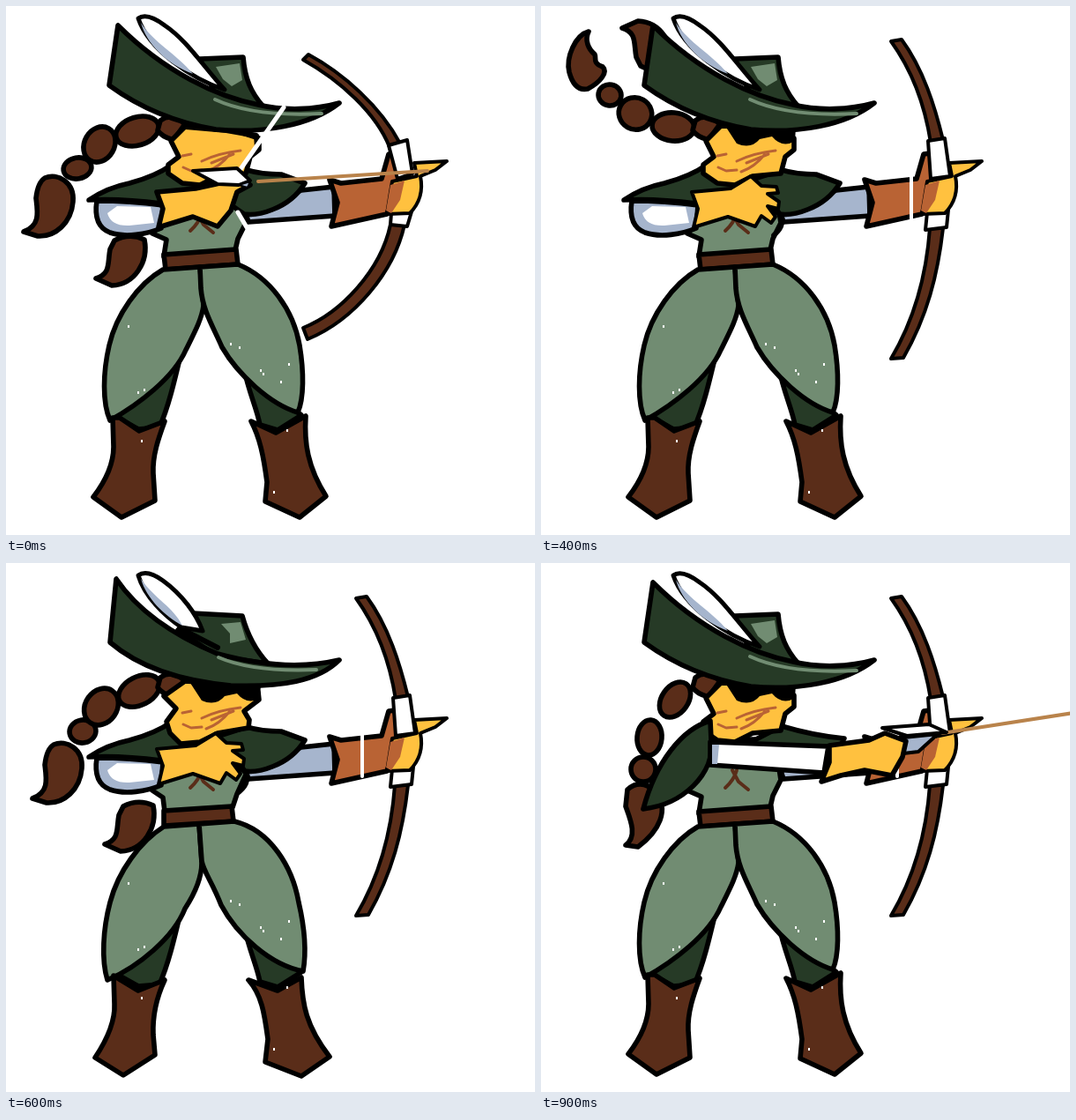
An HTML page with a canvas for the animation above (1 s loop, 600 px wide and 600 px high).

```html
<!DOCTYPE html>
<html lang="en">
<head>
<meta charset="utf-8">
<title>Archer</title>
<style>
html, body { margin: 0; width: 100%; height: 100%; overflow: hidden; background: #fff; }
canvas { display: block; width: 600px; height: 600px; }
</style>
</head>
<body>
<canvas id="stage" width="600" height="600"></canvas>
<script>
const ctx = document.getElementById('stage').getContext('2d');
const DARK = '#263a26', GREEN = '#718c72', BROWN = '#5a2d19', SKIN = '#ffc13f',
  RUST = '#b96334', BLUE = '#a6b5cd', WHITE = '#fff', INK = '#000', SHAFT = '#b9834b';
const PEN = 5.6;

ctx.lineJoin = ctx.lineCap = 'round';

function shape(d, fill, width = PEN) {
  const p = new Path2D(d);
  ctx.fillStyle = fill;
  ctx.fill(p);
  if (width) {
    ctx.strokeStyle = INK;
    ctx.lineWidth = width;
    ctx.stroke(p);
  }
}

function line(d, color, width) {
  ctx.strokeStyle = color;
  ctx.lineWidth = width;
  ctx.stroke(new Path2D(d));
}

function bead([x, y, rx, ry, deg]) {
  ctx.beginPath();
  ctx.ellipse(x, y, rx, ry, deg * Math.PI / 180, 0, 7);
  ctx.fillStyle = BROWN;
  ctx.fill();
  ctx.strokeStyle = INK;
  ctx.lineWidth = PEN;
  ctx.stroke();
}

const TAIL = 'M44 195 C59 189 78 200 76 222 C74 246 56 262 36 261 L20 256 C39 249 36 234 34 218 Q36 200 44 195Z';
const TAIL_LOW = 'M123 266 Q140 257 157 265 C162 290 146 316 120 317 L102 309 C119 304 115 292 118 276Z';
const TAIL_MID = 'M61 46 C46 50 35 75 39 92 C43 107 50 113 60 111 C75 103 83 92 77 86 C65 82 70 76 68 72 C61 66 56 56 61 46Z';

function tail(d, dx = 0, dy = 0, flip = 1) {
  ctx.save();
  ctx.translate(dx, dy);
  ctx.scale(1, flip);
  shape(d, BROWN);
  ctx.restore();
}

const hair = {
  rest() {
    tail(TAIL_LOW);
    [[81, 184, 16, 12, -10], [106, 157, 17, 21, 30], [149, 142, 25, 16, -17]].forEach(bead);
    tail(TAIL);
  },
  sway() {
    tail(TAIL_LOW, 10, 10);
    [[87, 191, 15, 13, -10], [108, 163, 18, 22, 35], [151, 145, 25, 16, -27]].forEach(bead);
    tail(TAIL, 10, 11);
  },
  up() {
    tail(TAIL_LOW, -17, 318, -1);
    [[78, 86, 15, 11, 10], [104, 114, 20, 18, 40], [149, 131, 25, 16, 15]].forEach(bead);
    tail(TAIL, -2, 274, -1);
  },
  fall() {
    tail(TAIL_LOW, -10, 334, -1);
    [[78, 101, 13, 12, 10], [107, 122, 19, 18, 30], [150, 137, 24, 16, 5]].forEach(bead);
    tail(TAIL_MID, -7, -17);
  },
  half() {
    shape('M124 28 C105 35 98 58 104 78 Q110 90 125 88 L150 118 L180 125 L150 70Z', BROWN);
    [[83, 115, 12, 14, -15], [112, 131, 18, 19, 40], [152, 142, 23, 15, -15]].forEach(bead);
    tail(TAIL_MID);
  },
  swing() {
    shape('M98 257 Q114 243 130 260 C146 280 134 304 110 322 L96 320 C110 310 101 290 96 276Z', BROWN);
    [[116, 234, 14, 14, 0], [123, 198, 14, 20, 5], [152, 155, 15, 22, 35]].forEach(bead);
  }
};

function specks() {
  ctx.fillStyle = WHITE;
  for (const [x, y] of [[138, 362], [156, 434], [149, 437], [264, 386], [254, 382],
    [288, 412], [291, 416], [320, 405], [311, 425], [153, 492], [318, 480], [303, 550]])
    ctx.fillRect(x, y, 2, 3);
}

function legs(alt) {
  shape('M125 466 L199 392 C190 430 184 455 174 478 L150 480Z', DARK);
  shape('M270 412 C276 440 284 455 288 475 L308 481 L335 464Z', DARK);
  if (alt) {
    shape('M179 299 C152 316 127 350 118 385 C110 415 108 450 115 473 C150 458 190 425 203 392 C216 372 222 355 222 340 L219 296Z', GREEN);
    shape('M219 296 L259 293 C300 303 325 345 332 385 C339 415 341 440 337 463 C300 456 262 422 244 388 C234 362 224 350 222 338Z', GREEN);
    shape('M122 468 L150 485 L180 473 C172 490 166 510 167 535 L169 558 L133 581 L101 561 C115 540 124 520 123 500Z', BROWN);
    shape('M275 473 L308 485 L335 470 C336 500 340 525 367 560 L335 582 L294 566 L297 540 C293 510 290 490 275 473Z', BROWN);
  } else {
    shape('M178 299 C150 315 125 350 117 385 C110 415 109 450 118 470 C150 452 190 422 204 390 C214 370 222 355 224 340 L220 296Z', GREEN);
    shape('M220 296 L263 293 C300 308 326 345 333 385 C338 415 338 445 331 461 C300 452 263 418 245 387 C234 362 223 345 221 320Z', GREEN);
    shape('M121 467 L129 467 L151 482 L180 471 C173 490 166 510 167 530 L169 561 L131 580 L99 557 C112 540 122 520 122 500Z', BROWN);
    shape('M278 471 L306 484 L340 465 C338 495 342 523 363 556 L333 580 L294 562 L296 540 C292 510 288 490 278 471Z', BROWN);
  }
  specks();
}

function torso(alt) {
  shape(alt
    ? 'M178 200 L176 238 L166 258 L178 266 L180 282 L257 277 L262 262 L272 240 L262 200Z'
    : 'M186 200 L178 240 L166 258 L182 265 L179 284 L260 277 L263 264 L272 246 L265 200Z', GREEN);
  line('M222 235 Q219 246 209 255 M217 235 L224 248 L235 257', BROWN, 4);
  shape(alt ? 'M179 281 L256 276 L258 293 L179 298Z' : 'M179 282 L261 276 L263 293 L181 299Z', BROWN);
}

function bow(drawn) {
  if (drawn) {
    shape('M337 61 L343 55 C382 76 425 114 447 156 L435 160 C420 122 380 85 337 61Z', BROWN, 4);
    shape('M436 248 L452 248 C440 302 395 356 342 378 L337 365 C380 348 425 300 436 248Z', BROWN, 4);
    shape('M434 158 L455 152 L461 190 L444 196Z', WHITE, 4);
    shape('M437 235 L461 230 L455 250 L436 248Z', WHITE, 4);
  } else {
    shape('M397 40 L409 38 C434 72 447 115 456 152 L442 155 C436 116 423 76 397 40Z', BROWN, 4);
    shape('M441 252 L456 252 C450 305 438 352 411 399 L397 400 C422 358 437 308 441 252Z', BROWN, 4);
    shape('M439 153 L458 150 L464 193 L442 196Z', WHITE, 4);
    shape('M438 234 L462 231 L460 251 L436 254Z', WHITE, 4);
  }
}

function bowArm(drawn) {
  shape('M367 197 L380 201 L426 196 L434 168 L441 167 L446 200 L432 236 L369 250 L376 223Z', RUST);
  bow(drawn);
  shape('M463 178 L500 176 L487 186 L470 193 Q475 218 458 235 L432 236 L438 199 L466 193Z', SKIN, 4);
  shape('M436 203 L452 198 L447 220 L437 235 L431 232Z', RUST, 0);
}

function face(masked, alt) {
  shape('M175 130 Q188 120 203 134 L190 152 Q176 148 172 141Z', BROWN);
  shape(alt
    ? 'M203 134 L179 151 L193 165 L182 180 L186 193 L198 205 L220 203 L240 193 L275 187 L276 178 L270 168 L287 155 L286 146 L250 137Z'
    : 'M204 136 L187 153 L196 171 L184 180 L184 190 L200 201 L220 203 L240 193 L272 190 L277 171 L287 163 L287 150 L250 138Z', SKIN);
  if (masked) shape('M207 133 L222 156 Q238 163 248 151 L262 148 Q274 162 288 153 L289 138Z', INK, 0);
  else line('M204 137 L250 141 L284 147 L285 161', INK, 6);
  line('M200 170 L210 168 M201 183 L210 187 L222 186 M222 176 Q240 167 266 164 M227 188 Q242 183 254 168 M233 178 L258 168', RUST, 3);
}

function hat(alt) {
  if (alt) {
    shape('M212 57 L268 60 C274 82 284 100 297 114 L240 106 L195 76Z', DARK);
    shape('M244 69 L266 67 L272 87 L254 91 L254 80Z', GREEN, 0);
    shape('M125 18 L118 90 C152 119 200 134 255 139 C312 141 354 134 378 110 C340 119 295 118 240 103 C190 82 150 55 125 18Z', DARK);
    line('M241 107 Q280 124 352 121', GREEN, 4);
    shape('M150 14 Q160 7 178 20 C200 36 216 58 223 77 L199 73 C180 60 157 38 150 14Z', WHITE, 5);
    shape('M153 18 C168 40 190 50 200 71 C180 60 159 40 153 18Z', BLUE, 0);
    line('M199 75 L240 96', INK, 6);
  } else {
    shape('M220 60 L269 58 C271 83 278 98 291 113 L240 106Z', DARK);
    shape('M238 69 L265 65 L268 84 L256 91 L246 83Z', GREEN, 0);
    shape('M127 22 L117 90 C150 114 190 132 238 140 C290 145 345 136 378 110 C350 118 315 119 286 112 C240 103 180 75 127 22Z', DARK);
    line('M237 106 Q280 126 358 122', GREEN, 4);
    shape('M150 14 Q160 7 180 22 C204 38 222 66 248 95 C210 82 162 50 150 14Z', WHITE, 5);
    shape('M153 19 C168 42 193 54 212 77 C182 66 159 42 153 19Z', BLUE, 0);
  }
}

function cape() {
  shape('M94 220 Q115 206 140 201 Q170 193 188 180 L202 199 L220 203 L273 186 Q290 191 312 191 L339 201 Q326 222 302 231 Q285 238 270 236 L240 215 L176 224 Q130 218 94 220Z', DARK);
}

function restArm(drawn) {
  shape('M103 221 C100 240 105 252 118 257 C135 263 160 259 176 252 L178 226 Q140 221 103 221Z', BLUE);
  shape('M115 235 L126 227 L164 228 L168 246 L140 249 Q119 250 115 235Z', WHITE, 0);
  if (drawn) {
    shape('M171 211 L215 207 L238 202 L262 196 L277 203 L262 211 L255 232 L240 250 L212 239 L173 251 L178 230Z', SKIN);
    shape('M212 187 L262 184 L277 198 L264 203 L240 202Z', WHITE, 4);
    shape('M264 203 L277 199 L274 206Z', BLUE, 2);
  } else {
    line('M268 232 Q280 247 264 260', INK, PEN);
    shape('M171 211 L215 207 L238 193 L250 204 L267 205 L269 212 L257 213 L270 222 L269 230 L257 227 L266 239 L261 246 L250 238 L243 250 L212 239 L173 251 L178 230Z', SKIN, 4);
  }
}

function reachArm() {
  shape('M192 179 C160 188 130 226 116 279 C160 274 198 240 193 200Z', DARK);
  shape('M192 203 L326 208 L321 238 L192 229Z', WHITE);
  shape('M194 206 L202 206 L200 228 L194 228Z', BLUE, 0);
  shape('M327 207 L372 201 L390 193 L414 202 L410 220 L398 241 L367 235 L340 241 L318 248 L327 226Z', SKIN);
}

function looseArrow(x, y, endY) {
  line(`M${x} ${y} L604 ${endY}`, SHAFT, 4);
}

function star() {
  shape('M228 130 Q229 145 241 147 Q229 148 225 161 Q224 148 213 146 Q226 145 228 130Z', WHITE, 0);
}

function archer({ braid, drawn, alt, reach, flying, glint, string = 412 }) {
  ctx.fillStyle = WHITE;
  ctx.fillRect(0, 0, 600, 600);
  hair[braid]();
  torso(alt);
  legs(alt);
  shape('M272 236 L335 209 L372 205 L373 238 L275 245Z', BLUE);
  if (reach) shape('M240 202 L273 185 Q310 196 344 199 L335 215 L250 212Z', DARK);
  else cape();
  bowArm(drawn);
  face(!drawn, alt);
  hat(alt);
  if (drawn) {
    line('M315 115 L266 185 M263 234 L273 251', WHITE, 5);
    line('M286 199 L478 187', SHAFT, 4);
  } else line(`M${string} 192 L${string} 242`, WHITE, 4);
  if (flying) {
    looseArrow(465, 190, 182);
    shape('M399 178 L425 177 L465 190 L437 192 L410 186Z', WHITE, 4);
    shape('M403 212 L425 195 L464 191 L440 207Z', BLUE, 4);
  }
  if (reach) {
    looseArrow(455, 193, 170);
    shape('M387 187 L440 183 L460 192 L415 196Z', WHITE, 4);
    shape('M411 198 L450 194 L428 214 L411 216Z', BLUE, 4);
    reachArm();
  } else restArm(drawn);
  if (glint) star();
}

// [start in ms, pose]
const steps = [
  [0, { braid: 'rest', drawn: true }],
  [200, { braid: 'rest', drawn: true, glint: true }],
  [300, { braid: 'up', flying: true, glint: true, string: 425 }],
  [400, { braid: 'fall', string: 420 }],
  [500, { braid: 'half' }],
  [600, { braid: 'sway', alt: true, string: 404 }],
  [700, { braid: 'rest' }],
  [800, { braid: 'sway', alt: true, string: 404 }],
  [900, { braid: 'swing', reach: true, string: 404 }]
];

let shown;
const start = performance.now();
function tick() {
  const t = (performance.now() - start) % 1000;
  const pose = steps.findLast(([at]) => at <= t)[1];
  if (pose !== shown) archer(shown = pose);
  requestAnimationFrame(tick);
}
tick();
</script>
</body>
</html>
```
